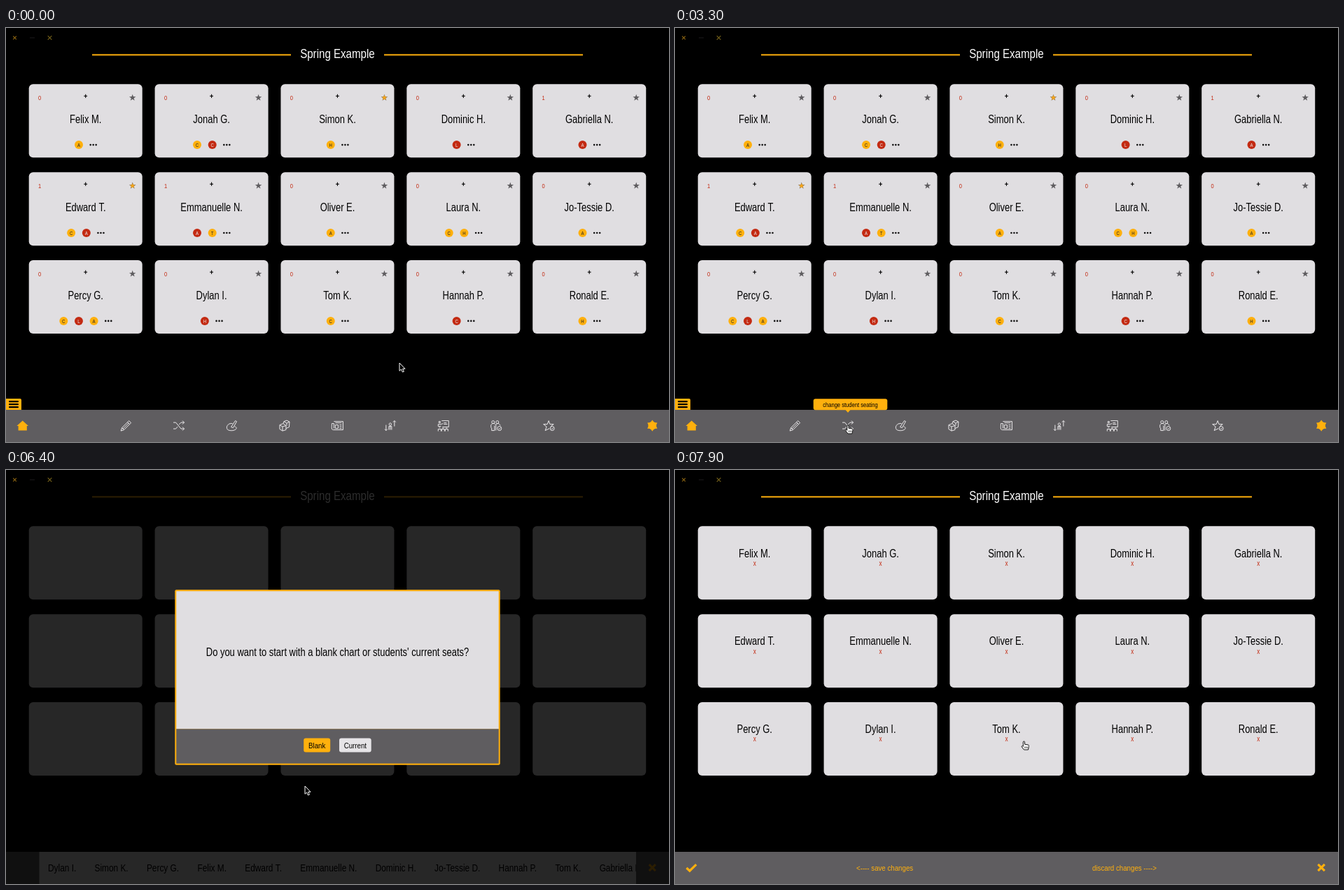
These frames come from a looping animation (947x592 px, 8 s). An HTML page with a canvas:

```html
<!DOCTYPE html>
<html lang="en">
<head>
<meta charset="utf-8">
<title>Seating chart</title>
<style>
html, body { margin: 0; width: 947px; height: 592px; overflow: hidden; background: #000; }
canvas { display: block; }
</style>
</head>
<body>
<canvas id="stage" width="947" height="592"></canvas>
<script>
const W = 947, H = 592, LOOP = 8000, STEP = 100;
const GOLD = '#ffb00d', LIGHT = '#e0dee1', GREY = '#5f5d60', RED = '#c32a12';
const NARROW = 0.82; // condensed face, same for all text
const stage = document.getElementById('stage').getContext('2d');
const layer = document.createElement('canvas');
layer.width = W;
layer.height = H;
const modalCtx = layer.getContext('2d');
let c = stage;

// name, badges (lower case = red), points, starred
const students = [
  ['Felix M.', 'A', 0, 0], ['Jonah G.', 'Cc', 0, 0], ['Simon K.', 'H', 0, 1], ['Dominic H.', 'l', 0, 0], ['Gabriella N.', 'a', 1, 0],
  ['Edward T.', 'Ca', 1, 1], ['Emmanuelle N.', 'aT', 1, 0], ['Oliver E.', 'A', 0, 0], ['Laura N.', 'CH', 0, 0], ['Jo-Tessie D.', 'A', 0, 0],
  ['Percy G.', 'ClA', 0, 0], ['Dylan I.', 'h', 0, 0], ['Tom K.', 'C', 0, 0], ['Hannah P.', 'c', 0, 0], ['Ronald E.', 'H', 0, 0]
];
const roster = [11, 2, 10, 0, 5, 6, 3, 9, 13, 12, 4];

const icons = [
  // pencil
  'M-7.5 7.5L-6 3L4-7L7-4L-3 6ZM2-5L5-2M-6 3L-3 6M-4.5 4.5L3.5-3.5',
  // shuffle
  'M-8-4.5H-4.5L3 4.5H7.5M-8 4.5H-4.5L-2 1.5M0-1.5L3-4.5H7.5M5-7L7.5-4.5L5-2M5 2L7.5 4.5L5 7',
  // palette
  'M1-3C-4-4-8 0-7 4C-6 8 3 8 6 5C8 2 5 2 4 1M-1 2L5-7L7-6L2 3ZM-4 1h.1M-4 4h.1M0 5h.1M3 4h.1M-2-1h.1',
  // dice
  'M-7-1L-2-3L2 0L2 6L-3 7.5L-7 5ZM-7-1L-3 1.5L2 0M-3 1.5V7.5M-2-3L-1-6L3-7.5L7-5.5L6.5 2L2 4M-1-6L3-3.5L7-5.5M3-3.5V0M-5 3h.1M0 4h.1M5-1h.1',
  // newspaper
  'M-5-6H8V6H-6C-9 6-8 2-8-3H-5V4M-3-4H6M-3-1H1V4H-3ZM3-1H6M3 1.5H6M3 4H6',
  // swap seats
  'M-6-1V7M-8 5L-6 7L-4 5M6 1V-7M4-5L6-7L8-5M-2 6V1H2V6M0 1V6M-1.7-2A1.7 1.7 0 1 0 1.7-2A1.7 1.7 0 1 0-1.7-2',
  // lesson
  'M-2-7H8V2H-1M1-4H5M1-2H6M-6-6h2v2h-2ZM-7 1V-2H-3L0-3M-7 1H-3M-7 8V5H-3V8M-2 8V5H2V8M3 8V5H7V8M-6 2.5h2M-1 3.5h2M4 3.5h2',
  // group
  'M-6-5a2 2 0 1 0 4 0a2 2 0 1 0-4 0M0-5a2 2 0 1 0 4 0a2 2 0 1 0-4 0M-7 3V-1L-5-3H-2L0-1L2-3H4L6-1V0M-6 3V7H-2V0M0-1V7M2 4a3 3 0 1 0 6 0a3 3 0 1 0-6 0M3.5 4L4.7 5.2L6.7 3',
  // star
  'M0-7L1.8-2H7L3 1M1 4L-5 7L-3 1.5L-7.5-2H-2L0-7M2 4a3 3 0 1 0 6 0a3 3 0 1 0-6 0M3.5 4L4.7 5.2L6.7 3'
].map(d => new Path2D(d));

const arrow = new Path2D('M0 0V11.3L2.6 9L4.4 13L6.4 12.2L4.6 8.3H8Z');
const hand = new Path2D('M-1.2 1C-1.2-.4 1-.4 1 1V4.2L6 5C7 5.3 7 6 6.8 7.5L6 12H0L-3.3 7.8C-3.6 6.5-2.4 6-1.2 7.4Z');

// cursor path: time, x, y
const track = [
  [0, 562, 479], [1500, 562, 479], [1600, 477, 476], [1700, 420, 490], [1800, 375, 507],
  [2000, 305, 535], [2200, 262, 553], [2400, 247, 560], [2500, 247, 568], [5400, 247, 568],
  [5500, 256, 562], [5700, 330, 517], [6000, 414, 474], [6300, 414, 474], [6400, 427, 452],
  [6500, 456, 424], [6600, 485, 399], [6700, 498.5, 388], [8000, 498.5, 388]
];

function text(s, x, base, size, color, align = 'center', weight = '') {
  c.save();
  c.translate(x, base);
  c.scale(NARROW, 1);
  c.font = `${weight} ${size}px "Liberation Sans", Arial, sans-serif`;
  c.textAlign = align;
  c.fillStyle = color;
  c.fillText(s, 0, 0);
  const w = c.measureText(s).width * NARROW;
  c.restore();
  return w;
}

function box(x, y, w, h, r, color) {
  c.beginPath();
  c.roundRect(x, y, w, h, r);
  c.fillStyle = color;
  c.fill();
}

function disc(x, y, r, color) {
  c.beginPath();
  c.arc(x, y, r, 0, 7);
  c.fillStyle = color;
  c.fill();
}

function line(pts, color, width) {
  c.beginPath();
  pts.forEach(p => c.lineTo(...p));
  c.strokeStyle = color;
  c.lineWidth = width;
  c.stroke();
}

function spikes(x, y, n, outer, inner, color) {
  c.beginPath();
  for (let i = 0; i < n * 2; i++) {
    const a = i * Math.PI / n - Math.PI / 2, r = i % 2 ? inner : outer;
    c.lineTo(x + r * Math.cos(a), y + r * Math.sin(a));
  }
  c.closePath();
  c.fillStyle = color;
  c.fill();
}

function cross(x, y, r, color, width) {
  line([[x - r, y - r], [x + r, y + r]], color, width);
  line([[x - r, y + r], [x + r, y - r]], color, width);
}

function eachCard(draw) {
  students.forEach((s, i) => {
    const x = 113.7 + 179.88 * (i % 5), y = 80.3 + 125.9 * Math.floor(i / 5);
    box(x - 81, y, 162, 105, 6, LIGHT);
    if (draw) draw(s, x, y);
  });
}

function header() {
  c.fillStyle = '#000';
  c.fillRect(0, 0, W, H);
  text('Spring Example', 473.4, 43, 18.4, '#fff');
  c.fillStyle = GOLD;
  c.fillRect(123, 37.4, 284, 2);
  c.fillRect(540, 37.4, 284, 2);
}

function bar() {
  c.fillStyle = GREY;
  c.fillRect(0, 546, W, 46);
}

function windowButtons() {
  cross(12.5, 14, 2.3, '#8a6312', 1.2);
  line([[34, 14], [41, 14]], '#1c1b1c', 1);
  cross(62.5, 14, 2.8, '#75621a', 1.1);
}

function classCard([name, badges, points, starred], x, y) {
  text(points, x - 65.6, y + 22.6, 9.2, RED);
  line([[x - 2.4, y + 17], [x + 2.4, y + 17]], '#000', 1.1);
  line([[x, y + 14.4], [x, y + 19.6]], '#000', 1.1);
  spikes(x + 67, y + 19.4, 5, 5, 2, GREY);
  if (starred) spikes(x + 67, y + 19.5, 5, 4.2, 1.8, '#f5a51b');
  text(name, x, y + 55.4, 15.8, '#000');
  let bx = x - 9.7 - 10.85 * (badges.length - 1);
  for (const b of badges) {
    const up = b.toUpperCase(), gold = b === up;
    disc(bx, y + 86.8, 6, gold ? GOLD : RED);
    text(up, bx, y + 89.5, 7.4, gold ? '#222' : '#eee');
    bx += 21.65;
  }
  for (let k = -1; k <= 1; k++) disc(bx - 1 + k * 4, y + 86.8, 1.3, '#111');
}

function toolbar() {
  bar();
  box(0, 530, 22, 16, [0, 2, 0, 0], GOLD);
  for (let i = 0; i < 3; i++) box(4, 533 + i * 4, 14, 2.3, 1, '#000');
  c.lineWidth = 1;
  icons.forEach((p, i) => {
    c.save();
    c.translate(171.6 + i * 75.45, 568.6);
    c.strokeStyle = '#eceaec';
    c.stroke(p);
    c.restore();
  });
  c.fillStyle = GOLD;
  c.fill(new Path2D('M23.7 561.5L32 569H29.8V575.5H17.6V569H15.4Z'));
  spikes(923.2, 568.6, 6, 8.2, 5.2, GOLD);
  disc(923.2, 568.6, 5.8, GOLD);
}

function tooltip(alpha) {
  c.globalAlpha = alpha;
  box(197.7, 530.2, 105.6, 16, 3, GOLD);
  c.fill(new Path2D('M243.5 546H250.5L247 550Z'));
  text('change student seating', 250.4, 541.6, 9.25, '#000');
  c.globalAlpha = 1;
}

function blankSeats(t) {
  header();
  eachCard();
  bar();
  c.fillStyle = LIGHT;
  c.fillRect(47.5, 546, 852.5, 46);
  if (t < 4400) return;
  c.save();
  c.beginPath();
  c.rect(47.5, 546, 852.5, 46);
  c.clip();
  let x = 60;
  for (const i of roster) x += text(students[i][0], x, 573.8, 14.47, '#000', 'left') + 26.3;
  c.restore();
  cross(923.2, 568.6, 4.5, GOLD, 3);
}

function filledSeats() {
  header();
  eachCard(([name], x, y) => {
    text(name, x, y + 44.2, 15.8, '#000');
    text('x', x, y + 56.3, 10, RED);
  });
  bar();
  line([[16.5, 569], [21, 573.2], [30.3, 564.2]], GOLD, 3.2);
  cross(923.2, 568.5, 4.7, GOLD, 3.2);
  text('<---- save changes', 259, 573.2, 11.84, GOLD, 'left');
  text('discard changes ---->', 596, 573.2, 11.84, GOLD, 'left');
}

function buildModal() {
  c = modalCtx;
  c.fillStyle = 'rgba(0,0,0,.826)';
  c.fillRect(0, 0, W, H);
  c.clearRect(242, 172, 463, 249);
  box(241.3, 171.3, 464.4, 250.4, 2, GOLD);
  c.fillStyle = LIGHT;
  c.fillRect(243.3, 173.3, 460.4, 197);
  c.fillStyle = GREY;
  c.fillRect(243.3, 370.3, 460.4, 49.4);
  text("Do you want to start with a blank chart or students' current seats?", 473.5, 266, 15.8, '#000');
  box(425.2, 383.6, 38, 20, 3, GOLD);
  box(476, 383.6, 45.7, 20, 3, '#e6e4e7');
  text('Blank', 444.2, 397.9, 11.84, '#000');
  text('Current', 498.8, 397.9, 11.84, '#000');
  c = stage;
}

function cursor(t) {
  const i = track.findIndex(k => k[0] > t);
  const [t0, x0, y0] = track[i - 1], [t1, x1, y1] = track[i];
  const p = (t - t0) / (t1 - t0);
  const isHand = (t >= 2600 && t < 5500) || t >= 6900;
  c.save();
  c.translate(x0 + (x1 - x0) * p, y0 + (y1 - y0) * p);
  c.lineWidth = 1;
  c.fillStyle = isHand ? '#fff' : '#000';
  c.strokeStyle = isHand ? '#111' : '#fff';
  const shape = isHand ? hand : arrow;
  c.fill(shape);
  c.stroke(shape);
  if (isHand) {
    c.lineWidth = 0.7;
    c.stroke(new Path2D('M1.2 7.5V10M3 7.5V10M4.8 7.5V10'));
  }
  c.restore();
}

function draw(t) {
  if (t < 4300) {
    header();
    eachCard(classCard);
    toolbar();
    if (t >= 2500) tooltip(Math.min(1, (t - 2400) / 300));
  } else if (t < 7300) {
    blankSeats(t);
  } else {
    filledSeats();
  }
  if (t >= 4300 && t < 7500) {
    c.globalAlpha = t < 7300 ? 1 : 0.6 - (t - 7300) / 250;
    c.drawImage(layer, 0, 0);
    c.globalAlpha = 1;
  }
  windowButtons();
  cursor(t);
}

buildModal();
let start = null;
function frame(now) {
  if (start === null) start = now;
  draw(Math.floor((now - start) % LOOP / STEP) * STEP);
  requestAnimationFrame(frame);
}
requestAnimationFrame(frame);
</script>
</body>
</html>
```
